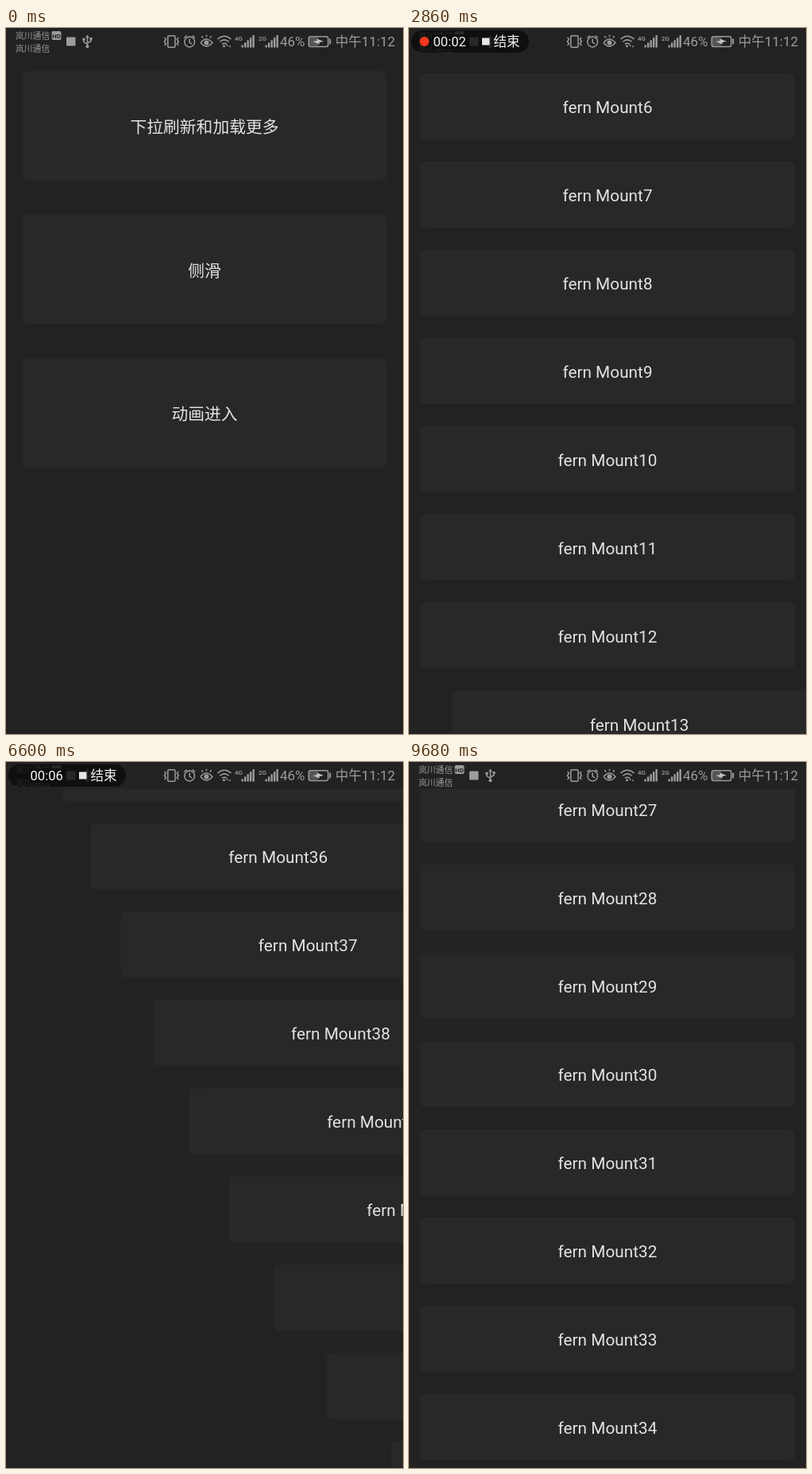
An HTML page that plays this animation: 500 px wide and 888 px high, repeating every 9.9 s.

```html
<!DOCTYPE html>
<html lang="zh-CN">
<head>
<meta charset="utf-8">
<title>List entrance</title>
<style>
  html, body { margin: 0; width: 100%; height: 100%; overflow: hidden; background: #222; }
  svg { display: block; width: 100vw; height: 100vh; }
  text { font-family: Roboto, "Noto Sans CJK SC", "Noto Sans CJK", sans-serif; }
  .label { font-size: 20.8px; fill: #e2e2e2; text-anchor: middle; }
  .thin { font-weight: 350; }
  .card { fill: #282828; }
  .bar { fill: #9c9c9c; }
  .line { fill: none; stroke: #9c9c9c; stroke-width: 1.5; }
  .pill { fill: #f4f4f4; font-size: 16.6px; }
</style>
</head>
<body>
<svg viewBox="0 0 500 888" preserveAspectRatio="none">
  <defs>
    <clipPath id="below"><rect y="34" width="1000" height="854"/></clipPath>
    <radialGradient id="touch">
      <stop offset="0" stop-color="#a4a4a4"/>
      <stop offset=".5" stop-color="#acabae"/>
      <stop offset=".72" stop-color="#cbc9d3"/>
      <stop offset=".82" stop-color="#5b566c" stop-opacity=".85"/>
      <stop offset="1" stop-color="#403c50" stop-opacity="0"/>
    </radialGradient>
  </defs>
  <rect width="500" height="888" fill="#222"/>
  <g id="home"></g>
  <rect id="dim" width="500" height="888"/>
  <g id="page">
    <rect width="500" height="888" fill="#222"/>
    <g id="list" clip-path="url(#below)"></g>
  </g>

  <g class="bar">
    <g font-size="10.8"><text x="12" y="13.5">岚川通信</text><text x="12" y="29.8">岚川通信</text></g>
    <rect x="57.5" y="4" width="12" height="11" rx="2"/>
    <text x="63.5" y="12.6" font-size="8" font-weight="700" text-anchor="middle" fill="#222">HD</text>
    <rect x="76" y="11.5" width="11.5" height="11" rx="1"/>
    <path class="line" d="M102.5 11V23M98 14.5V17.5L102.5 20.5M107 13.5V16.5L102.5 19"/>
    <path d="M102.5 8.5l2.4 3.8h-4.8zM96.4 12.8h3.2v3h-3.2zM105.4 12h3.2v3h-3.2z"/>
    <circle cx="102.5" cy="23.2" r="2"/>
  </g>

  <g class="bar">
    <rect class="line" x="203.8" y="9.8" width="9.2" height="14.4" rx="1.2"/>
    <path class="line" d="M199.5 12l2 2-2 3 2 3-2 2M217.3 12l-2 2 2 3-2 3 2 2"/>
    <circle class="line" cx="231.2" cy="17.5" r="6.4"/>
    <path class="line" d="M231.2 13.5V18l3 2M224.3 12.5l3.5-3M238.1 12.5l-3.5-3"/>
    <path class="line" d="M245 18.5q7.5-9 15 0q-7.5 9-15 0M248 12.5l-1.6-2.2M252.5 11.2V8.8M257 12.5l1.6-2.2"/>
    <circle cx="252.5" cy="18.5" r="3"/>
    <path class="line" d="M266.5 14q8.5-7.5 17 0M269.3 17.3q5.7-4.9 11.4 0M272 20.3q3-2.3 6 0"/>
    <circle cx="274.5" cy="22.8" r="1.5"/>
    <path d="M278.5 20.5l1.6 2h-3.2zM282 24.5l1.6-2h-3.2z"/>
    <g font-size="8" font-weight="500"><text x="288" y="16.3">4G</text><text x="318" y="16.3">2G</text></g>
    <g id="signal"></g>
    <text x="345" y="23.2" font-size="17">46%</text>
    <rect x="382" y="11.5" width="11" height="11" fill="#555"/>
    <rect class="line" x="381.3" y="10.8" width="24.4" height="12.6" rx="2.5"/>
    <rect x="407.2" y="13.5" width="2" height="7" rx=".8"/>
    <path d="M386.5 17l5.5-1-.5-2.5 8.500 3.500-5.500 1 .5 2.500z" fill="#c4c4c4"/>
    <text x="414.7" y="23.2" font-size="16.5">中午<tspan font-size="17">11:12</tspan></text>
  </g>

  <g id="recorder">
    <rect x="3" y="3" width="148" height="28" rx="14" fill="#0b0b0b" fill-opacity=".8"/>
    <rect x="29" y="8.5" width="46" height="17.5" fill="#0d0d0d"/>
    <circle id="rec" cx="19.3" cy="17" r="6" fill="#f4381c"/>
    <text id="clock" class="pill" x="30.5" y="23"></text>
    <rect x="92" y="12.5" width="9.5" height="9" fill="#e6e6e6"/>
    <text class="pill" x="106.5" y="23.2">结束</text>
  </g>
  <circle id="finger" r="20" fill="url(#touch)"/>
</svg>
<script>
const LOOP = 9900, STEP = 220, H = 888;
const PITCH = 111, FIRST = 47, ENTER = 300;
const OPEN = 800, OPENING = 910, REC_START = 220, REC_END = 9680;

// Each swipe adds a decelerating fling to the list offset
const FLINGS = [
  { at: 1827, dur: 1538, dist: 565 },
  { at: 3450, dur: 1300, dist: 1189 },
  { at: 5040, dur: 1100, dist: 700 },
  { at: 6256, dur: 712, dist: 1625 },
  { at: 7500, dur: 1000, dist: 331 },
  { at: 8790, dur: 880, dist: -1495 }
];
const BACK = FLINGS[FLINGS.length - 1].at;

const TOUCHES = [
  { at: 220, x: 391, y: 468 },
  { at: 5060, x: 338.5, y: 776.5 },
  { at: 8800, x: 362, y: 530 }
];

const $ = id => document.getElementById(id);
const show = (id, on) => { $(id).style.display = on ? '' : 'none'; };
const move = (id, x, y = 0) => $(id).setAttribute('transform', `translate(${x} ${y})`);
const clamp = v => Math.min(1, Math.max(0, v));
const easeOut = v => 1 - (1 - clamp(v)) ** 3;

const card = (x, y, w, h) => `<rect class="card" x="${x}" y="${y}" width="${w}" height="${h}" rx="6"/>`;
const label = (y, s, cls = '') => `<text class="label ${cls}" x="250" y="${y}">${s}</text>`;

$('home').innerHTML = ['下拉刷新和加载更多', '侧滑', '动画进入'].map((s, i) => {
  const y = 54 + i * 180.5;
  return card(21, y, 458, 138.5) + label(y + 78.3, s, 'thin');
}).join('');

$('signal').innerHTML = [296.5, 326.5].map(x =>
  [0, 1, 2, 3, 4].map(i => {
    const h = 3 + i * 3.1;
    return `<rect x="${x + i * 3.5}" y="${24.5 - h}" width="2.4" height="${h}"/>`;
  }).join('')).join('');

const scrollAt = t => FLINGS.reduce((s, f) => s + f.dist * easeOut((t - f.at) / f.dur), 0);

// Time at which the list first reaches offset s, by bisection
function reachedAt(s) {
  if (s <= 0) return -Infinity;
  let lo = 0, hi = BACK;
  while (hi - lo > 0.5) {
    const mid = (lo + hi) / 2;
    if (scrollAt(mid) < s) lo = mid; else hi = mid;
  }
  return hi;
}

function drawList(t) {
  const s = scrollAt(t);
  let out = '';
  for (let i = Math.max(0, Math.floor((s - FIRST) / PITCH)); FIRST + i * PITCH - s < H; i++) {
    const top = FIRST + i * PITCH;
    const x = 500 * (1 - clamp((t - reachedAt(top - H)) / ENTER));
    out += `<g transform="translate(${x} ${top - s})">`
      + card(14, 0, 472, 83) + label(50, 'fern Mount' + (i + 1)) + '</g>';
  }
  $('list').innerHTML = out;
}

function draw(now) {
  const t = Math.floor(now % LOOP / STEP) * STEP;

  const p = easeOut((t - OPEN) / OPENING);
  show('page', p > 0);
  move('page', 500 * (1 - p));
  move('home', -178 * p);
  $('dim').setAttribute('opacity', 0.36 * p);
  if (p > 0) drawList(t);

  const time = Math.max(0, t - REC_START);
  show('recorder', t >= REC_START && t < REC_END);
  $('clock').textContent = '00:0' + Math.floor(time / 1000);
  show('rec', time % 1000 >= 500);

  const touch = TOUCHES.find(f => f.at === t);
  show('finger', touch);
  if (touch) move('finger', touch.x, touch.y);
}

const origin = performance.now();
function tick() {
  draw(performance.now() - origin);
  requestAnimationFrame(tick);
}
tick();
</script>
</body>
</html>
```
